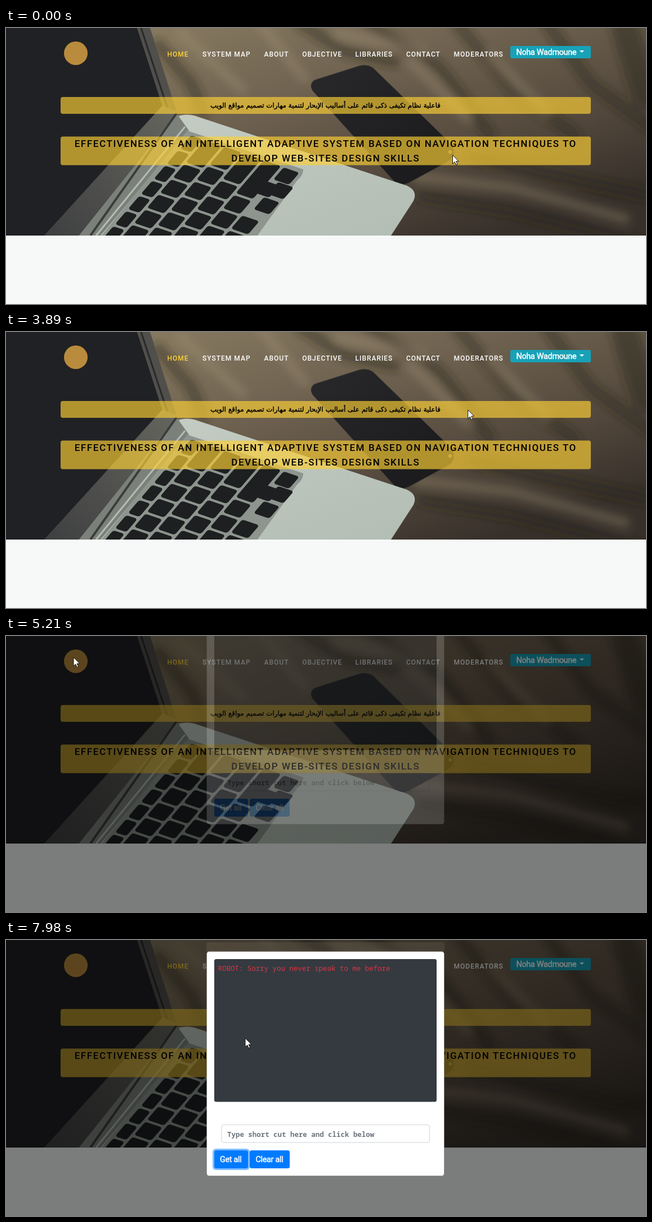
An HTML page for the animation above (8 s loop, 1137x492 px).

```html
<!DOCTYPE html>
<html lang="en">
<head>
<meta charset="utf-8">
<title>Adaptive system</title>
<style>
  html, body { margin: 0; width: 100%; height: 100%; overflow: hidden; background: #f7f9f9; }
  svg { display: block; width: 100vw; height: 100vh; }
  text { font-family: Roboto, sans-serif; white-space: pre; }
  .nav { font-size: 12px; font-weight: 500; letter-spacing: 1px; fill: #fff; }
  .title { font-size: 17px; font-weight: 500; letter-spacing: 1.61px; text-anchor: middle; }
  .arabic { font: 11.9px "DejaVu Sans", sans-serif; text-anchor: middle; stroke: #000; stroke-width: .4px; }
  .button { font-size: 14.4px; letter-spacing: -.3px; fill: #fff; stroke: #fff; stroke-width: .5px; }
  .item { font-size: 14.2px; letter-spacing: -.4px; fill: #212529; }
  .mono { font-family: "Noto Sans Mono", monospace; font-size: 12.45px; }
  .bar { fill: rgb(254 209 54 / .66); }
</style>
</head>
<body>
<svg viewBox="0 0 1137 492" preserveAspectRatio="none">
  <defs>
    <linearGradient id="cloth" x1=".25" y1="0" x2="1" y2=".75">
      <stop offset="0" stop-color="#85785f"/>
      <stop offset=".35" stop-color="#6f6250"/>
      <stop offset=".7" stop-color="#54493d"/>
      <stop offset="1" stop-color="#37302a"/>
    </linearGradient>
    <linearGradient id="silver" x1="0" y1="0" x2="1" y2="1">
      <stop offset="0" stop-color="#c6cec5"/>
      <stop offset="1" stop-color="#b2bdb4"/>
    </linearGradient>
    <linearGradient id="hinge" x1="1" y1="0" x2="0" y2="1">
      <stop offset="0" stop-color="#66665f"/>
      <stop offset="1" stop-color="#3e3f40"/>
    </linearGradient>
    <linearGradient id="glass" x1="0" y1="0" x2="1" y2="1">
      <stop offset="0" stop-color="#29292b"/>
      <stop offset="1" stop-color="#19191b"/>
    </linearGradient>
    <filter id="soft" x="-20%" y="-20%" width="140%" height="140%"><feGaussianBlur stdDeviation="8"/></filter>
    <clipPath id="hero"><rect width="1137" height="370"/></clipPath>
  </defs>

  <rect width="1137" height="492" fill="#f7f9f9"/>
  <g clip-path="url(#hero)">
    <rect width="1137" height="370" fill="url(#cloth)"/>
    <g fill="none" filter="url(#soft)" stroke-linecap="round" stroke-linejoin="round">
      <g stroke="#261f1a" stroke-opacity=".45" stroke-width="20">
        <path d="M270 30L330 100 350 150M520-10L600 40 690 60"/>
        <path d="M640-10L770 70 860 190M800-10L900 110 1010 190M960-10L1040 100 1150 180"/>
        <path d="M740 300L900 325 1150 390M830 230L960 260 1150 300"/>
        <path d="M1100 0L1137 120" stroke-width="50"/>
      </g>
      <g stroke="#a4947a" stroke-opacity=".35" stroke-width="18">
        <path d="M310 10L420 110M450-10L530 90M590 10L740 40"/>
        <path d="M720 60L820 160M860 50L960 150M730 265L900 285 1100 340"/>
      </g>
    </g>
    <path d="M548 93L630 67Q648 64 658 77L792 208Q802 228 785 238L715 276Q697 284 685 268L545 112Q538 100 548 93Z" fill="url(#glass)" stroke="#353331"/>
    <circle cx="789" cy="221" r="3" fill="#82734f"/>
    <path d="M0 0H233L280 140 68 370H0Z" fill="#202124"/>
    <path d="M233 0H256L304 152 278 140Z" fill="#504f4b"/>
    <path d="M240 0L288 146" stroke="#292a2b" stroke-width="3"/>
    <path d="M278 138L306 150 155 370H68Z" fill="url(#hinge)"/>
    <path d="M282 180Q300 148 334 156L712 281Q732 290 724 308L684 370H130Z" fill="url(#silver)"/>
    <path d="M303 152L325 183 168 370H130Z" fill="#7b807a"/>
    <path d="M303 152L150 370" stroke="#3b3d3c" stroke-width="4"/>
    <path d="M318 176L160 370" stroke="#b5bcb4" stroke-width="3"/>
    <path d="M322 183L528 252Q528 263 517 272L438 382H160Z" fill="#8d958e"/>
    <g id="keys" fill="#1d1f20"/>
  </g>

  <circle cx="124" cy="45" r="21" fill="#b98b3c"/>
  <g id="nav" class="nav"></g>
  <rect class="bar" x="97" y="123" width="942" height="30" rx="4"/>
  <text class="arabic" x="567.5" y="142" direction="rtl">فاعلية نظام تكيفى ذكى قائم على أساليب الإبحار لتنمية مهارات تصميم مواقع الويب</text>
  <rect class="bar" x="97" y="193.5" width="942" height="51" rx="4"/>
  <text class="title" x="567.8" y="212">EFFECTIVENESS OF AN INTELLIGENT ADAPTIVE SYSTEM BASED ON NAVIGATION TECHNIQUES TO</text>
  <text class="title" x="567.8" y="237.5">DEVELOP WEB-SITES DESIGN SKILLS</text>

  <rect id="userRing" x="893.5" y="29.5" width="148" height="27" rx="6" fill="#3ab0c3" fill-opacity=".5"/>
  <rect x="896" y="32" width="143" height="22" rx="3" fill="#17a2b8"/>
  <rect id="userDark" x="896" y="32" width="143" height="22" rx="3" fill="#127c8e"/>
  <text class="button" x="906.5" y="48">Noha Wadmoune</text>
  <path d="M1019 40H1027L1023 44Z" fill="#fff"/>

  <g id="menu">
    <rect x="897" y="72" width="134" height="95" rx="3" fill="#fff"/>
    <rect id="itemHover" x="897" width="134" height="27" fill="#f8f9fa"/>
    <text class="item" x="917" y="97">PROFILE</text>
    <text class="item" x="917" y="124">GO TO EXAMS</text>
    <text class="item" x="917" y="151">LOG OUT</text>
  </g>

  <rect id="backdrop" width="1137" height="492"/>
  <rect id="trail" x="356" y="4" width="423" height="18" rx="4" fill="#cbb9a6" fill-opacity=".1"/>
  <g id="modal">
    <rect x="356.5" y="20.5" width="422" height="400" rx="4.5" fill="#fff" stroke="#000" stroke-opacity=".2"/>
    <rect x="370" y="34" width="395" height="254.5" rx="3.5" fill="#343a40"/>
    <text id="reply" class="mono" x="376.5" y="55" fill="#dc3545">ROBOT: Sorry you never speak to me before</text>
    <rect x="383" y="329.5" width="369.5" height="31.5" rx="3.5" fill="#fff" stroke="#ced4da"/>
    <text class="mono" x="393" y="350.5" font-weight="700" fill="#6c757d">Type short cut here and click below</text>
    <rect id="getRing" x="367" y="372" width="66" height="38" rx="6" fill="#80bdff"/>
    <rect x="370" y="375" width="60" height="32" rx="3.5" fill="#007bff"/>
    <rect id="getDark" x="370" y="375" width="60" height="32" rx="3.5" fill="#0069d9"/>
    <text class="button" x="380" y="396">Get all</text>
    <rect x="433" y="375" width="71" height="32" rx="3.5" fill="#007bff"/>
    <text class="button" x="443.5" y="396">Clear all</text>
  </g>

  <g id="cursor">
    <circle id="press" cy="1" r="10.3" fill="#d3da2c" fill-opacity=".75"/>
    <path id="arrow" d="M0 0V15.5L3.6 12.2 6.2 17.6 8.6 16.5 6 11.2H10.8Z" fill="#fff" stroke="#111"/>
    <g id="hand" stroke="#111">
      <path d="M-1.5 2Q-1.5 0 0 0T1.5 2V8Q4 6.5 5 8.5 7 7.5 7.6 9.5 9 9 9 11V15L7.5 20.5H0L-5 13Q-6.5 10.5-4 11L-1.5 13Z" fill="#fff"/>
      <path d="M1.5 8V11M5 8.5V11M7.6 9.5V12" fill="none"/>
    </g>
  </g>
</svg>
<script>
const LOOP = 8000;
const $ = id => document.getElementById(id);

function add(parent, tag, attrs, content = "") {
  const node = document.createElementNS("http://www.w3.org/2000/svg", tag);
  for (const name in attrs) node.setAttribute(name, attrs[name]);
  node.textContent = content;
  parent.append(node);
}

const links = { HOME: 286.5, "SYSTEM MAP": 349, ABOUT: 458.5, OBJECTIVE: 526.2, LIBRARIES: 620.5, CONTACT: 711, MODERATORS: 795.5 };
for (const [label, x] of Object.entries(links)) {
  add($("nav"), "text", { x, y: 51, fill: label === "HOME" ? "#fed136" : "#fff" }, label);
}

// Keys lie on a skewed grid: a narrow function column, then staggered full ones.
function addKey(x, y, u, v, width, height) {
  add($("keys"), "rect", { x: u, y: v, width, height, rx: .13, transform: `matrix(35 12 -23 27 ${x} ${y})` });
}
for (let column = 0; column < 6; column++) {
  const left = column ? column - .3 : 0;
  const width = column ? .87 : .57;
  const firstLength = [1, 1.6, 1.3, 1.8, 2.3, 0][column];
  if (firstLength) addKey(328, 189, left + .06, .06, width, firstLength - .13);
  for (let row = 0; row < 7; row++) {
    addKey(328, 189, left + .06, (firstLength || 3.2) + row + .06, width, .87);
  }
}
for (const [x, y] of [[498, 264], [463, 287], [488, 290], [463, 317]]) addKey(x, y, -.4, -.4, .8, .8);

const clamp = p => Math.min(1, Math.max(0, p));
const ramp = (t, start, end) => clamp((t - start) / (end - start));
const between = (t, start, end) => t >= start && t < end;

// start, end, steps, x, y
const moves = [
  [460, 1150, 10, 970, 41],
  [1850, 2250, 6, 955, 97],
  [2570, 2870, 5, 953, 140],
  [2950, 3030, 2, 951, 157],
  [3700, 4500, 12, 117, 41],
  [4570, 4650, 2, 120, 38],
  [5650, 6420, 11, 404, 389],
  [7750, 7980, 4, 425, 175]
];
const presses = [[1320, 1470], [3260, 3400], [4800, 4960], [6800, 6960]];

function pointerAt(t) {
  let x = 793.5, y = 226.5;
  for (const [start, end, steps, toX, toY] of moves) {
    if (t < start) break;
    const p = Math.min(steps, Math.floor(ramp(t, start, end) * (steps - 1) + 1e-6) + 1) / steps;
    const eased = p * p * (3 - 2 * p);
    x += (toX - x) * eased;
    y += (toY - y) * eased;
  }
  return { x, y };
}

const inside = ({ x, y }, left, top, right, bottom) => x >= left && x <= right && y >= top && y <= bottom;
const fade = (id, value) => $(id).setAttribute("opacity", value);
const show = (id, visible) => fade(id, visible ? 1 : 0);

function render(t) {
  const pointer = pointerAt(t);
  const menuOpen = between(t, 1470, 3400);
  const onItem = menuOpen && inside(pointer, 897, 79, 1031, 160);
  const onUser = t < 5000 && inside(pointer, 896, 32, 1039, 54);
  const onGet = t > 5500 && inside(pointer, 370, 375, 430, 407);
  const hand = onItem || onUser || onGet;

  fade("userDark", ramp(t, 1000, 1150) - ramp(t, 3410, 3560));
  fade("userRing", ramp(t, 1420, 1570) - ramp(t, 3410, 3560));
  show("menu", menuOpen);
  show("itemHover", onItem);
  $("itemHover").setAttribute("y", 79 + 27 * Math.floor((pointer.y - 79) / 27));

  fade("backdrop", ramp(t, 5020, 5170) / 2);
  show("trail", t >= 5480);
  fade("modal", ramp(t, 5185, 5335));
  const lift = 100 * (1 - ramp(t, 5185, 5485)) ** 1.8;
  $("modal").setAttribute("transform", `translate(0 ${-lift})`);
  fade("getDark", ramp(t, 6290, 6420) - ramp(t, 7750, 7900));
  fade("getRing", ramp(t, 6800, 6950));
  show("reply", t >= 7000);

  $("cursor").setAttribute("transform", `translate(${pointer.x} ${pointer.y})`);
  show("hand", hand);
  show("arrow", !hand);
  show("press", presses.some(([start, end]) => between(t, start, end)));
}

const begin = performance.now();
function tick() {
  render((performance.now() - begin) % LOOP);
  requestAnimationFrame(tick);
}
tick();
</script>
</body>
</html>
```
